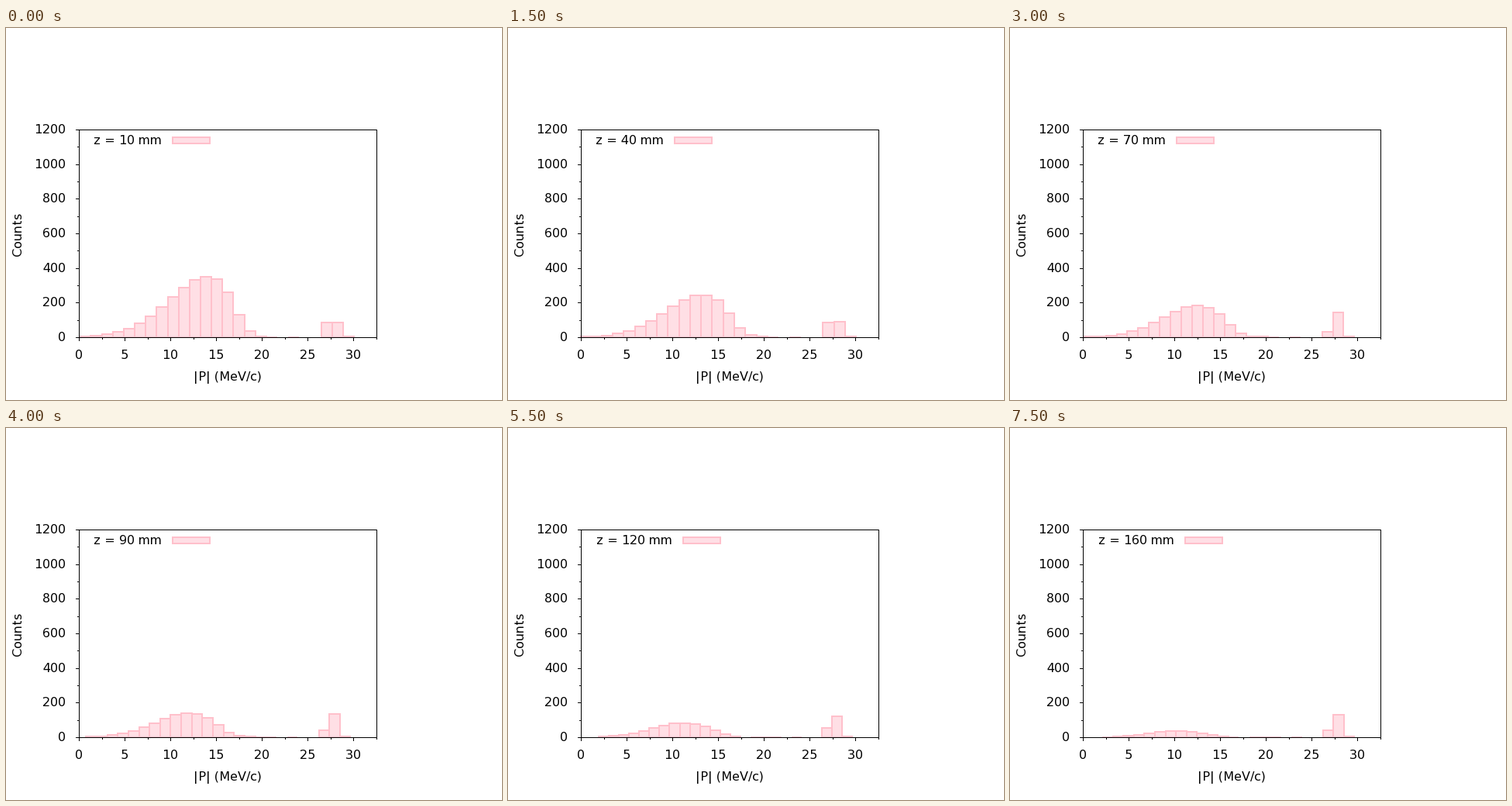
A matplotlib script that plays this animation: 640 px wide and 480 px high, repeating every 8 s.

```python
import numpy as np
import matplotlib.pyplot as plt
from matplotlib.animation import FuncAnimation
from matplotlib.patches import Rectangle

W, H, DPI = 640, 480, 100
PX = 72 / DPI
LEFT, RIGHT, TOP, BOTTOM = 94, 478, 131, 399
X_MAX, Y_MAX = 32.5, 1200
FRAMES, BINS = 16, 25
LINE, FILL = "#ffc0cb", "#ffdfe5"
STRAYS = [18.9, 20, 21, 23.4, 29.2, 29.2]  # lone momenta, two counts each

plt.rcParams.update({
    "font.family": "DejaVu Sans",
    "font.size": 16 * PX,
    "text.hinting_factor": 1,  # whole-pixel glyph advances
})


def bin_edges(z):
    """Equal bins between the lowest and highest momentum at depth z."""
    low = np.interp(z, [10, 20, 40, 60, 80, 90, 100, 120, 150, 160],
                    [0.11, -0.22, -0.16, 0.38, -0.1, 0.79, -0.1, 1.92, -0.1, 0.99])
    return np.linspace(low, 30.06 if z <= 60 else 29.66, BINS + 1)


def hump(p, z):
    """Skewed bell that sinks and slows down with depth."""
    height = np.interp(z, [10, 40, 90, 120, 160], [350, 245, 140, 82, 36])
    d = p - (14.1 - 0.027 * z)
    fall = np.where(d < 0,
                    (np.abs(d) / (5.9 - 0.012 * z)) ** 1.8,
                    (np.abs(d) / (3.6 + 0.005 * z)) ** 3)
    return height * np.exp(-fall)


def histogram(z):
    edges = bin_edges(z)
    counts = hump((edges[:-1] + edges[1:]) / 2, z)
    beam = 172 * np.clip((edges - 27.1) / 1.12, 0, 1)
    strays = np.histogram(STRAYS, edges)[0]
    return edges, counts + np.diff(beam) + 2 * strays


def px_x(v):
    return LEFT + v / X_MAX * (RIGHT - LEFT)


def px_y(v):
    return BOTTOM - v / Y_MAX * (BOTTOM - TOP)


fig = plt.figure(figsize=(W / DPI, H / DPI), dpi=DPI, facecolor="white")
ax = fig.add_axes([0, 0, 1, 1])
ax.set(xlim=(0, W), ylim=(H, 0))
ax.axis("off")


def box():
    return ax.add_patch(Rectangle((0, 0), 0, 0, fc=FILL, ec=LINE, lw=2 * PX,
                                  joinstyle="miter", snap=False))


def black(xs, ys):
    ax.plot(np.array(xs) + 0.5, np.array(ys) + 0.5, color="black", lw=PX,
            solid_capstyle="projecting", solid_joinstyle="miter", zorder=5,
            snap=False)


bars = [box() for _ in range(BINS)]
swatch = box()
legend = ax.text(0, 150, "", ha="right")

black([LEFT, RIGHT, RIGHT, LEFT, LEFT], [TOP, TOP, BOTTOM, BOTTOM, TOP])
for i in range(14):
    x = px_x(2.5 * i)
    black([round(x)] * 2, [BOTTOM, BOTTOM + (2 if i % 2 else 4)])
    if i % 2 == 0:
        ax.text(x - 0.5, 427, f"{5 * i // 2}", ha="center")
for i in range(13):
    y = round(px_y(100 * i))
    black([LEFT - (2 if i % 2 else 4), LEFT], [y, y])
    if i % 2 == 0:
        ax.text(77, y + 5, f"{100 * i}", ha="right")
ax.text(285.5, 455, "|P| (MeV/c)", ha="center")
ax.text(20, 265.5, "Counts", rotation=90, rotation_mode="anchor",
        ha="center", va="baseline")


def update(frame):
    z = 10 * (frame + 1)
    edges, counts = histogram(z)
    xs = np.maximum(np.round(px_x(edges)), LEFT)
    for bar, x0, x1, n in zip(bars, xs, xs[1:], counts):
        top = round(px_y(n))
        bar.set_bounds(x0, top, x1 - x0, BOTTOM - top)
        bar.set_visible(n >= 1)
    shift = 11 if z >= 100 else 0
    legend.set_text(f"z = {z} mm")
    legend.set_x(201 + shift)
    swatch.set_bounds(215 + shift, 141, 48, 8)
    return [*bars, swatch, legend]


anim = FuncAnimation(fig, update, frames=FRAMES, interval=500,
                     repeat=True, repeat_delay=0, blit=False)
plt.show()
```
